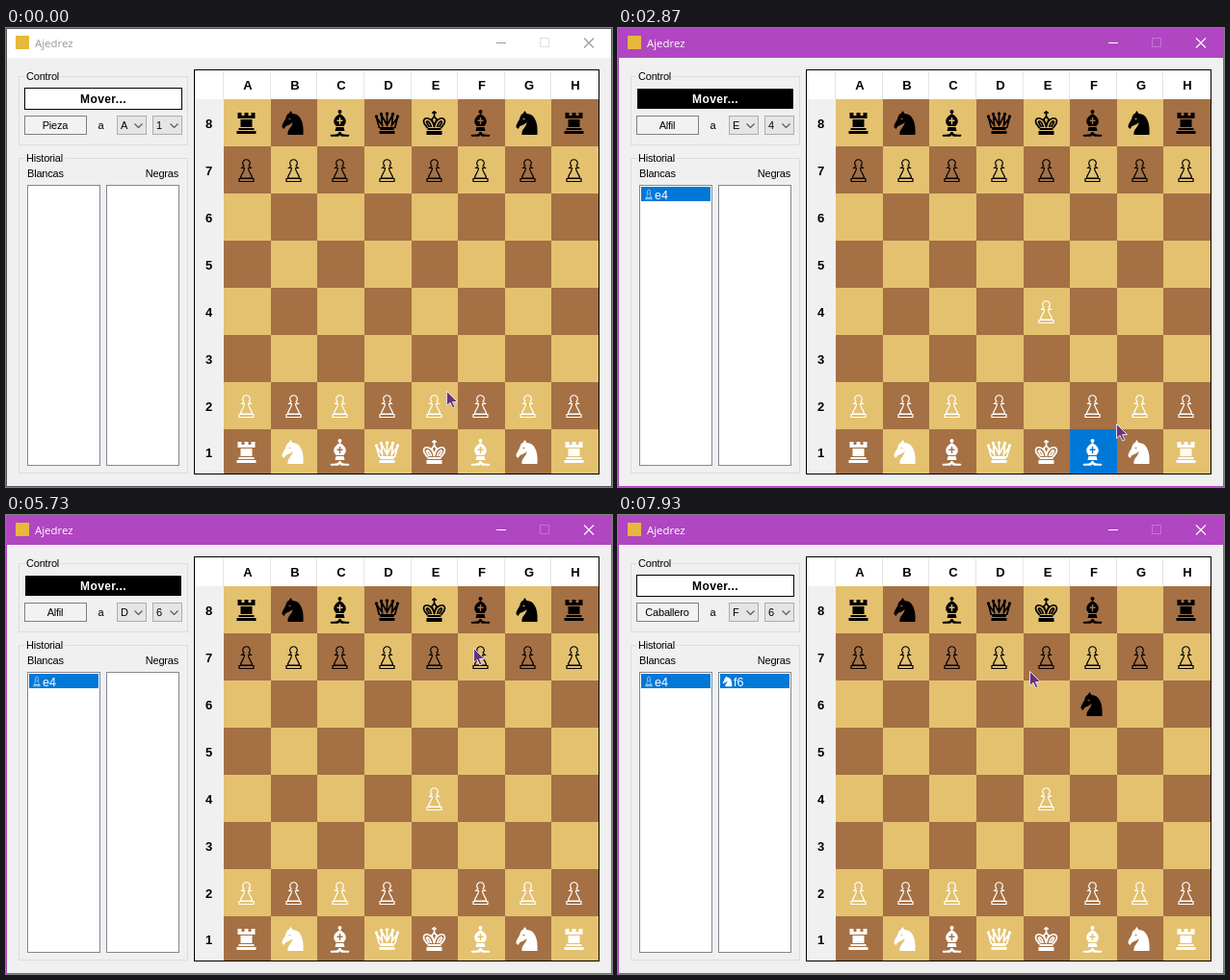
Write an HTML page that moves like this. It is 629x477 px and loops after 8000 ms.

```html
<!DOCTYPE html>
<html lang="es">
<head>
<meta charset="utf-8">
<title>Ajedrez</title>
<style>
  html, body { margin: 0; width: 629px; height: 477px; overflow: hidden; }
  svg { display: block; }
  rect { shape-rendering: crispEdges; }
  text { font: 11px "Liberation Sans", Arial, sans-serif; letter-spacing: -.2px; white-space: pre; }
  .head { font-weight: bold; font-size: 13px; letter-spacing: 0; }
  .turn { font-weight: bold; font-size: 12px; letter-spacing: .4px; }
  .item { font-size: 12.5px; letter-spacing: 0; }
  .title { font: 11.4px "Open Sans", "Noto Sans", sans-serif; letter-spacing: 0; }
  .mid { text-anchor: middle; }
  .end { text-anchor: end; }
</style>
</head>
<body>
<svg id="stage" width="629" height="477" viewBox="0 0 629 477"></svg>
<script>
const LOOP = 8000, RATE = 15;
const BLUE = '#0078d7', LIGHT = '#e3c16f', DARK = '#a57044', PURPLE = '#b146c2';
const stage = document.getElementById('stage');

function add(tag, attrs, parent = stage) {
  const el = document.createElementNS('http://www.w3.org/2000/svg', tag);
  set(el, attrs);
  parent.appendChild(el);
  return el;
}
function set(el, attrs) {
  for (const k in attrs) el.setAttribute(k, attrs[k]);
}
const rect = (x, y, width, height, fill, parent) => add('rect', { x, y, width, height, fill }, parent);
const box = (x, y, w, h, fill, stroke) =>
  add('rect', { x: x + .5, y: y + .5, width: w - 1, height: h - 1, fill, stroke });
const line = (d, stroke, w = 1) => add('path', { d, stroke, fill: 'none', 'stroke-width': w });
function label(s, x, y, cls = '', fill = '#000', parent = stage) {
  const el = add('text', { x, y, class: cls, fill }, parent);
  el.textContent = s;
  return el;
}

// Piece shapes around their centre: solid part, line part, line width
const ball = (x, y, r) => `M${x - r} ${y}a${r} ${r} 0 1 1 ${2 * r} 0a${r} ${r} 0 1 1 ${-2 * r} 0z`;
const shapes = {
  r: ['M-9-11h4v3h3v-3h4v3h3v-3h4v6H-9zM-6-4H6V4H-6zM-8 5H8v2H-8zM-10 8H10v3H-10z', '', 0],
  n: ['M-3-13l2 3c8 0 12 9 11 22H-6c-1-6 5-8 5-13c-3 3-5 3-7 4l-2 3-2-2c0-4 3-6 4-10 1-3 2-4 3-4zM-5-5h2v1h-2z', '', 0],
  b: [ball(0, -12, 2) + 'M0-10c5 3 7 6 6 10l-2 3H-4l-2-3c-1-4 1-7 6-10z' +
      'M-.7-6h1.4v2.5h2.3v1.4h-2.3v3h-1.4v-3h-2.3v-1.4h2.3zM-4 4H4l1 4H-5z' +
      'M-1 9c-1 4-6 2-9 3l1 2c4-1 8 1 9-2 1 3 5 1 9 2l1-2c-3-1-8 1-9-3z', '', 0],
  q: [ball(-11, -7, 1.7) + ball(-6, -9.5, 1.7) + ball(0, -10, 1.7) + ball(6, -9.5, 1.7) + ball(11, -7, 1.7) +
      'M-8 4H8L7 7H-7zM-8 8H8v3H-8z',
      'M-8 5L-11-6L-5 2L-6-9L0 2L6-9L5 2L11-6L8 5M0-9V2', 1.7],
  k: ['M-7 5H7v2H-7zM-8 8H8v4H-8z',
      'M0 4C-2-7-11-7-11-2C-11 1-8 3-7 5M0 4C2-7 11-7 11-2C11 1 8 3 7 5M0-13V-7M-2.5-11H2.5' +
      'M0-7L-2.5-4L0 2L2.5-4zM-3 4C-5-3-8-3-8-1L-5 4M3 4C5-3 8-3 8-1L5 4', 1.7],
  p: ['', 'M-2.6-4.7a3.8 3.8 0 1 1 5.2 0l2.2 2.2H2C2 2 6 4 6 8H-6C-6 4-2 2-2-2.5H-4.8zM-7.5 8.5h15v3h-15z', 1.2]
};
function piece(kind, x, y, color, parent, scale = 1) {
  const [solid, lines, w] = shapes[kind];
  const g = add('g', { transform: `translate(${x} ${y}) scale(${scale})` }, parent);
  add('path', { d: solid, fill: color, 'fill-rule': 'evenodd' }, g);
  add('path', { d: lines, fill: 'none', stroke: color, 'stroke-width': w }, g);
}

// Window
rect(0, 0, 629, 477, '#f0f0f0');
const bar = rect(0, 0, 629, 31);
const frame = box(0, 0, 629, 477, 'none');
rect(10, 8, 14, 14, '#e6b83c');
const title = label('Ajedrez', 30, 20, 'title');
const minimize = line('M509 15.5h10');
const maximize = line('M554.5 10.5h9v9h-9z');
const close = line('M600 10.5l10 10M610 10.5l-10 10', '', 1.1);

// Side panel
function group(name, y, h, w) {
  box(13, y, 176, h, 'none', '#dcdcdc');
  rect(19, y - 3, w, 8, '#f0f0f0');
  label(name, 21, y + 4);
}
group('Control', 50, 72, 38);
group('Historial', 135, 328, 42);
const turnBox = box(19, 62, 164, 23);
const turn = label('Mover...', 101, 78, 'turn mid');
box(19, 91, 65, 20, '#f2f2f2', '#808080');
const pieceName = label('', 51, 105, 'mid');
label('a', 98.5, 105, 'mid');
function combo(x) {
  box(x, 91, 31, 20, '#e5e5e5', '#adadad');
  line(`M${x + 18.5} 99.5l4 4l4-4`, '#555', 1.1);
  return label('', x + 4, 105);
}
const fileBox = combo(115), rankBox = combo(152);
label('Blancas', 22, 155);
label('Negras', 179, 155, 'end');
function history(x, kind, move) {
  box(x, 163, 76, 292, '#fff', '#828790');
  const g = add('g', {});
  rect(x + 2, 165, 72, 15, BLUE, g);
  piece(kind, x + 10, 173, '#fff', g, .43);
  label(move, x + 16, 178, 'item', '#fff', g);
  return g;
}
const whiteItem = history(22, 'p', 'e4');
const blackItem = history(104, 'n', 'f6');

// Board
const colX = c => 226 + Math.round(48.625 * c);
const rowY = r => 74 + 49 * r;
const rowH = r => r < 7 ? 49 : 46;
const midY = r => r < 7 ? rowY(r) + 25 : 441;
rect(196, 44, 419, 30, '#fff');
for (let i = 0; i < 8; i++) {
  rect(colX(i) - 1, 44, 1, 30, '#e5e5e5');
  label('ABCDEFGH'[i], colX(i) + 25, 64, 'head mid');
  label(8 - i, 210.5, midY(i) + 5, 'head mid');
  for (let c = 0; c < 8; c++)
    rect(colX(c), rowY(i), colX(c + 1) - colX(c), rowH(i), (i + c) % 2 ? DARK : LIGHT);
}
box(195, 43, 421, 421, 'none', '#000');
const men = add('g', {});

const arrow = add('path', {
  d: 'M.5.5V15.5L4 12.3L6.7 18L9 17L6.5 11.5H11.5Z',
  fill: '#65347a', stroke: '#ead9ee', 'stroke-width': 1
});

// Pointer path: step, x, y
const path = [
  [0, 457, 377], [2, 457, 377], [10, 445, 246], [13, 445, 246], [16, 441, 359], [18, 441, 382],
  [20, 441, 384], [25, 443, 292], [26, 443, 292], [34, 477, 436], [37, 477, 436], [43, 517, 411],
  [48, 585, 352], [50, 585, 352], [56, 510, 419], [58, 510, 419], [61, 466, 147], [64, 466, 147],
  [68, 474, 104], [69, 474, 104], [75, 383, 195], [77, 384, 197], [79, 384, 197], [90, 543, 104],
  [93, 543, 104], [99, 567, 201], [102, 578, 202], [105, 567, 199], [110, 495, 196], [111, 495, 196],
  [115, 470, 393], [118, 422, 207], [119, 427, 162]
];
// Clicks: step and what they change
const clicks = [
  [0, { name: 'Pieza', to: 'A1', sel: '', black: false, moves: [] }],
  [2, { active: true, name: 'Peón', sel: 'E2' }],
  [13, { to: 'E5', sel: '' }],
  [19, { sel: 'E2' }],
  [26, { to: 'E4', sel: '', black: true, moves: ['E2E4'] }],
  [37, { name: 'Alfil', sel: 'F1' }],
  [49, { to: 'H3', sel: '' }],
  [68, { sel: 'F8' }],
  [79, { to: 'D6', sel: '' }],
  [93, { name: 'Caballero', sel: 'G8' }],
  [111, { to: 'F6', sel: '', black: false, moves: ['E2E4', 'G8F6'] }]
];

function pointer(step) {
  let i = 0;
  while (i < path.length - 2 && path[i + 1][0] <= step) i++;
  const [s, x, y] = path[i], [s2, x2, y2] = path[i + 1];
  const k = Math.min(1, (step - s) / (s2 - s));
  return [Math.round(x + (x2 - x) * k), Math.round(y + (y2 - y) * k)];
}

function drawMen({ sel, moves }) {
  men.replaceChildren();
  const at = {};
  [...'ABCDEFGH'].forEach((f, i) => {
    at[f + 8] = ['rnbqkbnr'[i], '#000'];
    at[f + 7] = ['p', '#000'];
    at[f + 2] = ['p', '#fff'];
    at[f + 1] = ['rnbqkbnr'[i], '#fff'];
  });
  for (const m of moves) {
    at[m.slice(2)] = at[m.slice(0, 2)];
    delete at[m.slice(0, 2)];
  }
  for (const sq in at) {
    const c = sq.charCodeAt(0) - 65, r = 8 - sq[1];
    if (sq === sel) rect(colX(c), rowY(r), colX(c + 1) - colX(c), rowH(r), BLUE, men);
    piece(at[sq][0], colX(c) + 23.5, midY(r), sq === sel ? '#fff' : at[sq][1], men);
  }
}

function drawState(s) {
  const ink = s.active ? '#fff' : '#999';
  set(bar, { fill: s.active ? PURPLE : '#fff' });
  set(frame, { stroke: s.active ? PURPLE : '#555' });
  set(title, { fill: ink });
  set(minimize, { stroke: ink });
  set(close, { stroke: ink });
  set(maximize, { stroke: s.active ? '#c873d5' : '#ddd' });
  set(turnBox, { fill: s.black ? '#000' : '#fff', stroke: s.black ? '#fff' : '#000' });
  set(turn, { fill: s.black ? '#fff' : '#000' });
  pieceName.textContent = s.name;
  fileBox.textContent = s.to[0];
  rankBox.textContent = s.to[1];
  set(whiteItem, { visibility: s.moves.length > 0 ? 'visible' : 'hidden' });
  set(blackItem, { visibility: s.moves.length > 1 ? 'visible' : 'hidden' });
  drawMen(s);
}

let lastStep = -1, lastCount = -1;
const start = performance.now();
function tick() {
  const t = (performance.now() - start) % LOOP;
  const step = Math.min(119, Math.floor((t + 5) * RATE / 1000));
  if (step !== lastStep) {
    lastStep = step;
    const done = clicks.filter(c => c[0] <= step);
    if (done.length !== lastCount) {
      lastCount = done.length;
      drawState(Object.assign({}, ...done.map(c => c[1])));
    }
    set(arrow, { transform: `translate(${pointer(step)})` });
  }
  requestAnimationFrame(tick);
}
tick();
</script>
</body>
</html>
```
